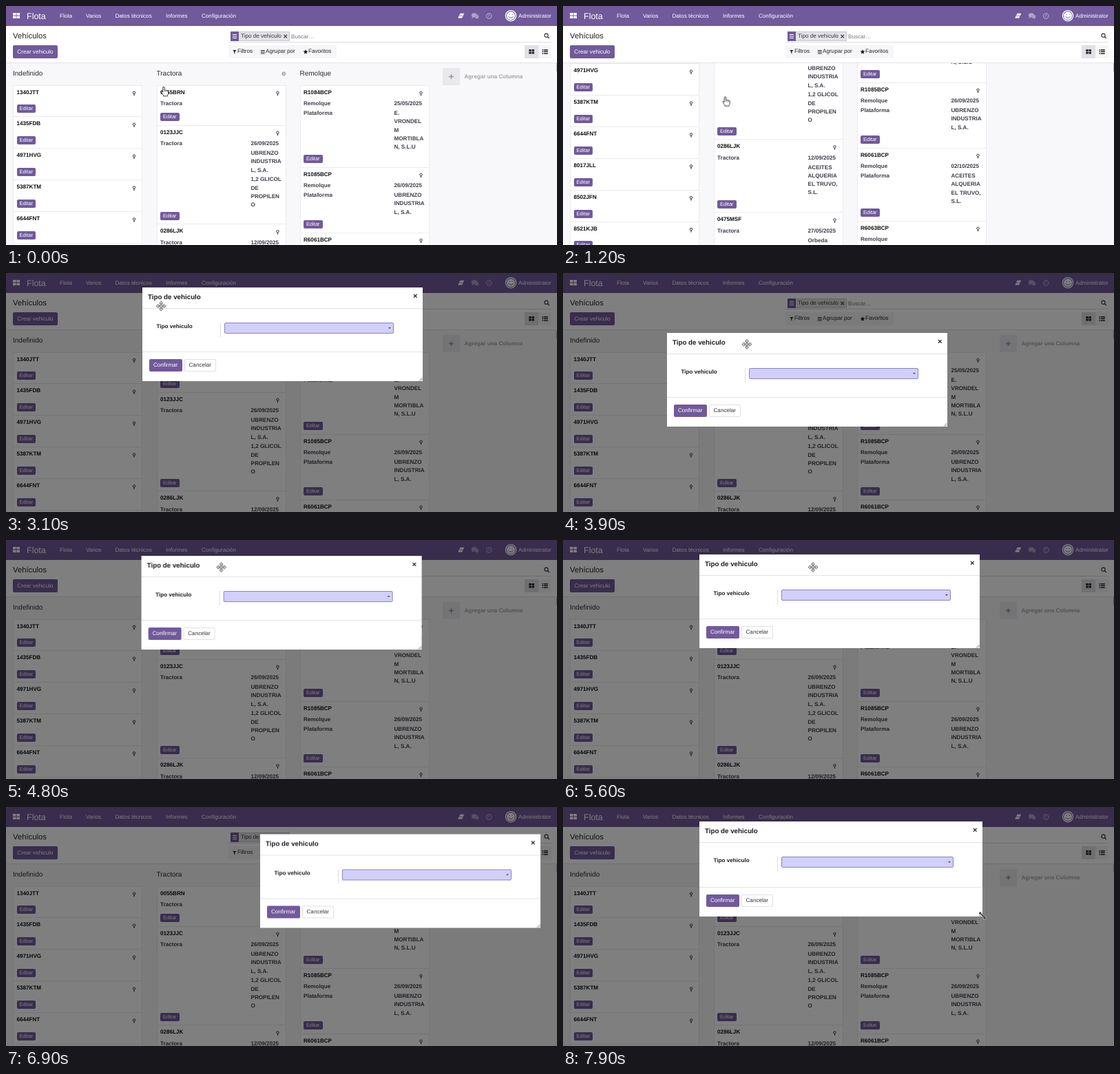
Animation of 800 by 347 pixels, one loop 8 s. Source, as an HTML page:

```html
<!DOCTYPE html>
<html lang="es">
<head>
<meta charset="utf-8">
<title>Flota</title>
<style>
html, body { margin: 0; width: 100%; height: 100%; overflow: hidden; background: #fff; }
#stage {
  position: relative; width: 800px; height: 347px; overflow: hidden; background: #fff;
  font: 8.125px "Liberation Sans", Arial, sans-serif; color: #363841;
  text-rendering: geometricPrecision; --main: #705a9b; --line: #ebeaef;
}
#stage *, #stage { box-sizing: border-box; }
.t, .box, svg, .btn { position: absolute; }
.t { line-height: 12px; margin-top: -6px; white-space: nowrap; }
svg { left: 0; top: 0; overflow: visible; }
b.t { color: #3f404a; }
b.name { color: #111; }
.btn { background: var(--main); color: #fff; text-align: center; border-radius: 2px; white-space: nowrap; }
.edit { width: 27.5px; height: 12px; font-size: 7.5px; line-height: 12px; }
.head { font-size: 10px; color: #2c2c30; }

#nav { left: 0; top: 0; width: 800px; height: 28.5px; background: var(--main); color: #fff; }
#board { left: 0; top: 82px; width: 800px; height: 265px; overflow: hidden; background: #f8f7fa; border-top: 1px solid #e4e3e8; }
#scroll { left: 0; top: -83px; width: 800px; animation: scroll 8s infinite; }
#bar { left: 799px; top: 83px; width: 1px; height: 12px; background: #b5b5ba; }
.card { width: 188px; background: #fff; border: 1px solid var(--line); border-bottom: 0; }
#gear { animation: gear 8s step-end infinite; }
#create { left: 10px; top: 56.5px; width: 65px; height: 19px; line-height: 19px; animation: hover 8s step-end infinite; }

#shade { inset: 0; background: #000; animation: shade 8s infinite; }
#modal {
  left: 0; top: 0; width: 407px; height: 136px; background: #fff; color: #111;
  animation: drag 8s ease-in-out infinite, grow 8s linear infinite, show 8s infinite;
}
#modal b.t { color: #1c1c22; }
.rule { left: 0; right: 0; height: 1px; background: #e3e3e7; }
#select { left: 118.5px; right: 42.5px; top: 51px; height: 16px; background: #d2cffb; border: 1px solid #8c83bd; border-radius: 2px; }
#select i { position: absolute; right: 3px; top: 6px; border: 2px solid transparent; border-top: 2.5px solid #444; border-bottom: 0; }
#modal .btn { bottom: 14px; height: 18px; line-height: 18px; }
#modal .plain { background: #fff; color: #333; border: 1px solid #e0e0e4; line-height: 16px; }

#cursor { left: 0; top: 0; animation: point 8s ease-in-out infinite; }
#hand { animation: hand 8s step-end infinite; }
#move { animation: move 8s step-end infinite; }
#size { animation: size 8s step-end infinite; }

@keyframes scroll {
  0%, 6.25% { transform: none; }
  8.75%, 11.25% { transform: translateY(-61.5px); }
  13.75%, 18.75% { transform: translateY(-123px); }
  21.25% { transform: translateY(-61.5px); }
  23.75%, 100% { transform: none; }
}
@keyframes gear { 0% { opacity: 1; } 24% { opacity: 0; } }
@keyframes hover { 0% { background: var(--main); } 27% { background: #56457c; } 36% { background: var(--main); } }
@keyframes shade { 0%, 34.5% { opacity: 0; } 37%, 100% { opacity: .5; } }
@keyframes show { 0%, 35% { opacity: 0; } 37.5%, 100% { opacity: 1; } }
@keyframes drag {
  0%, 35% { transform: translate(198px, 8px); }
  37.5%, 41.25% { transform: translate(198px, 21px); }
  48.75%, 51.25% { transform: translate(151px, 87px); }
  61.25%, 71.25% { transform: translate(198px, 21px); }
  81.25%, 87.5% { transform: translate(369px, 39.5px); }
  93.75%, 100% { transform: translate(198px, 21px); }
}
@keyframes grow {
  0%, 97% { width: 407px; height: 136px; }
  98.75%, 100% { width: 411px; height: 138px; }
}
@keyframes point {
  0% { transform: translate(229px, 117px); }
  15%, 21.25% { transform: translate(235.5px, 131.5px); }
  27.5%, 35% { transform: translate(44px, 69.5px); }
  41.25% { transform: translate(314px, 37.5px); }
  48.75%, 51.25% { transform: translate(267px, 103.5px); }
  61.25% { transform: translate(314px, 37.5px); }
  67.5%, 71.25% { transform: translate(363px, 39.5px); }
  81.25%, 87.5% { transform: translate(534px, 58px); }
  93.75% { transform: translate(363px, 39.5px); }
  97% { transform: translate(605px, 155.5px); }
  98.75%, 100% { transform: translate(609px, 157.5px); }
}
@keyframes hand { 0% { opacity: 1; } 37% { opacity: 0; } }
@keyframes move { 0% { opacity: 0; } 37% { opacity: 1; } 85% { opacity: 0; } 87.5% { opacity: 1; } 96.5% { opacity: 0; } }
@keyframes size { 0% { opacity: 0; } 96.5% { opacity: 1; } }
</style>
</head>
<body>
<div id="stage">
  <div id="board" class="box"><div id="scroll" class="box"></div></div>
  <div id="bar" class="box"></div>

  <div id="nav" class="box">
    <svg width="800" height="28" fill="#fff">
      <path d="M10 10h4.600v3.600H10zM15.400 10H20v3.600h-4.600zM10 14.500h4.600v3.600H10zM15.400 14.500H20v3.600h-4.600z"/>
      <path d="M659.500 10.800h5.800l-3.300 6.600h-5.800z"/><path d="M658 14.200h5.300" stroke="#705a9b" stroke-width=".8"/>
      <g opacity=".45">
        <ellipse cx="679.800" cy="13.300" rx="4" ry="3"/><path d="M677 15l-.8 3 3-1.700z"/>
        <path d="M684.500 12.500q3.500 2.500.7 4.700l.8 1.800-2.700-1.200q-2 .2-3.800-1 4.500-.3 5-4.300z"/>
        <circle cx="701.300" cy="14.500" r="3.700" fill="none" stroke="#fff" stroke-width="1.200"/>
        <path d="M701.500 12.300v2.600h-1.800" fill="none" stroke="#fff" stroke-width=".9"/>
      </g>
      <circle cx="733" cy="14.200" r="7.600" fill="none" stroke="#fff" stroke-width="1.300"/>
      <circle cx="733" cy="14.200" r="6"/>
      <path d="M729.300 14.800q3.700 5.200 7.400 0M730.300 12.200h1.500M734.300 12.200h1.500" fill="none" stroke="#705a9b"/>
    </svg>
  </div>

  <div id="panel">
    <div id="create" class="btn">Crear vehiculo</div>
    <div class="box" style="left:323px;top:52px;width:469px;height:1px;background:#dddce3"></div>
    <div class="box" style="left:326px;top:37px;width:86px;height:13.5px;background:#e2e2e5;border:1px solid #c9c8d0"></div>
    <div class="box" style="left:326px;top:37px;width:12px;height:13.5px;background:#705a9b"></div>
    <div class="box" style="left:323px;top:57px;width:157px;height:19px;background:#f6f6f8"></div>
    <div class="box" style="left:753px;top:57px;width:39px;height:19px;background:#f6f6f8"></div>
    <div class="box" style="left:753px;top:57px;width:20px;height:19px;background:#e0e0e6"></div>
    <svg width="800" height="83" fill="#222">
      <path d="M329 41.500h6M329 44h6M329 46.500h6" stroke="#fff" stroke-width="1.200"/>
      <path d="M403.500 41.800l4.400 4.400m0-4.400l-4.400 4.400" stroke="#555" stroke-width="1.500"/>
      <circle cx="784.500" cy="42.700" r="2.600" fill="none" stroke="#333" stroke-width="1.100"/>
      <path d="M786.400 44.600l2.400 2.400" stroke="#333" stroke-width="1.300"/>
      <path d="M329.200 64h5.200l-2 2.600v3l-1.200-1v-2z"/>
      <path d="M369.800 64.500h6M369.800 66.800h6M369.800 69h6" stroke="#222" stroke-width="1.100"/>
      <path d="M435 63l1 2.200 2.400.3-1.800 1.700.5 2.400-2.100-1.200-2.100 1.200.5-2.400-1.800-1.700 2.400-.3z"/>
      <path d="M759.300 63h3.400v2.800h-3.400zM763.500 63h3.400v2.800h-3.400zM759.300 66.600h3.400v2.800h-3.400zM763.500 66.600h3.400v2.800h-3.400z"/>
      <path d="M778.500 63.700h1.500m.8 0h6M778.500 66.300h1.500m.8 0h6M778.500 68.900h1.500m.8 0h6" stroke="#222" stroke-width="1.500"/>
    </svg>
  </div>

  <div id="shade" class="box"></div>
  <div id="modal" class="box">
    <b class="t" style="left:8px;top:14.5px;font-size:9.75px">Tipo de vehiculo</b>
    <b class="t" style="right:7.5px;top:13px;font-size:11px">×</b>
    <div class="box rule" style="top:30px"></div>
    <b class="t" style="left:20.5px;top:57px">Tipo vehiculo</b>
    <div class="box" style="left:113px;top:51px;width:1px;height:21px;background:#dedee3"></div>
    <div id="select" class="box"><i></i></div>
    <div class="box rule" style="bottom:42px"></div>
    <div class="btn" style="left:9.5px;width:48.5px">Confirmar</div>
    <div class="btn plain" style="left:61px;width:45.5px">Cancelar</div>
    <svg width="6" height="6" style="left:auto;top:auto;right:0;bottom:0"><path d="M1 5.500l4.500-4.500M3.300 5.500l2.200-2.200" stroke="#666" stroke-width=".8"/></svg>
  </div>

  <div id="cursor" class="box">
    <svg id="hand" width="12" height="15" fill="#fff" stroke="#222" stroke-width=".9" stroke-linejoin="round">
      <path d="M-1.200 1q1.200-1.800 2.400 0v4.300q1.200-1 2 .1 1.200-.7 1.900.4 1.500-.4 1.600 1v3q-.2 1.700-1.200 2.700v1.300H-.5v-1.300q-1.600-1.800-2.800-4.500-.3-1.600 1.100-1.100l1 1.100z"/>
      <path d="M1.200 5.500v2M3.200 5.800v1.900M5.100 6.200v1.600" stroke-width=".6"/>
    </svg>
    <svg id="move" width="1" height="1" fill="#fff" stroke="#333" stroke-width=".8" stroke-linejoin="round">
      <path id="arrows" d=""/>
    </svg>
    <svg id="size" width="1" height="1" fill="#222" stroke="#fff" stroke-width=".5">
      <path d="M-5-5h4.200l-1.400 1.400 5.800 5.800L5 .8V5H.8l1.400-1.400-5.800-5.800L-5-.8z"/>
    </svg>
  </div>
</div>

<script>
const $ = id => document.getElementById(id);
const add = (id, html) => $(id).insertAdjacentHTML('beforeend', html);
const text = (x, y, s, cls = '', tag = 'span', css = '') =>
  `<${tag} class="t ${cls}" style="left:${x}px;top:${y}px;${css}">${s}</${tag}>`;

add('nav', text(30, 14.5, 'Flota', '', 'span', 'font-size:12.5px') +
  [[78, 'Flota'], [116, 'Varios'], [158.5, 'Datos técnicos'], [232, 'Informes'],
   [284, 'Configuración'], [744, 'Administrator']].map(([x, s]) => text(x, 14.5, s)).join(''));

add('panel', text(10, 43.5, 'Vehículos', '', 'span', 'font-size:11.25px;color:#222') +
  text(341, 43.7, 'Tipo de vehiculo') +
  text(414, 44.5, 'Buscar…', '', 'span', 'color:#777') +
  [[336, 'Filtros'], [377, 'Agrupar por'], [439, 'Favoritos']]
    .map(([x, s]) => text(x, 66.3, s, '', 'span', 'color:#222')).join(''));

const pin = (x, y) => `<svg width="1" height="1" fill="none" stroke="#333">
  <circle cx="${x}" cy="${y - 1.2}" r="1.7"/><path d="M${x} ${y + .6}v2.600" stroke-width="1.200"/></svg>`;

// Each row is [label, value]; "|" marks a line break inside the value.
function card(x, top, h, name, rows = []) {
  let y = top + 27.8;
  let html = `<div class="box card" style="left:${x}px;top:${top}px;height:${h}px"></div>` +
    text(x + 5.5, top + 11, name, 'name', 'b') + pin(x + 176, top + 12.5);
  for (const [label, value = ''] of rows) {
    html += text(x + 5.5, y, label, '', 'b');
    const lines = value.split('|');
    lines.forEach((s, i) => html += text(x + 137, y + i * 12.3, s, '', 'b'));
    y += (lines.length - 1) * 12.3 + 13.7;
  }
  return html + `<div class="btn edit" style="left:${x + 5.5}px;top:${top + h - 17.3}px">Editar</div>`;
}

function column(x, title, cards) {
  let top = 114.5;
  add('scroll', text(x, 98.5, title, 'head'));
  for (const [h, name, rows] of cards) {
    add('scroll', card(x, top, h, name, rows));
    top += h;
  }
}

const plant = 'UBRENZO|INDUSTRIA|L, S.A.';
const oil = 'ACEITES|ALQUERIA|EL TRUVO,|S.L.';

column(10, 'Indefinido',
  ['1340JTT', '1435FDB', '4971HVG', '5387KTM', '6644FNT', '8017JLL', '8502JFN', '8521KJB']
    .map(name => [45.9, name]));
column(218.5, 'Tractora', [
  [58, '0055BRN', [['Tractora']]],
  [143.5, '0123JJC', [['Tractora', '26/09/2025'], ['', plant], ['', '1,2 GLICOL|DE|PROPILEN|O']]],
  [106, '0286LJK', [['Tractora', '12/09/2025'], ['', oil]]],
  [106, '0475MSF', [['Tractora', '27/05/2025'], ['', 'Orbeda']]]
]);
column(426.5, 'Remolque', [
  [119, 'R1084BCP', [['Remolque', '25/05/2025'], ['Plataforma', 'E.|VRONDEL|M|MORTIBLA|N, S.L.U']]],
  [95, 'R1085BCP', [['Remolque', '26/09/2025'], ['Plataforma', plant]]],
  [106, 'R6061BCP', [['Remolque', '02/10/2025'], ['Plataforma', oil]]],
  [106, 'R6063BCP', [['Remolque'], ['Plataforma']]]
]);

add('scroll', `<svg id="gear" width="1" height="1" fill="none" stroke="#999">
    <circle cx="403.300" cy="98.500" r="1.800" stroke-width="1.300"/>
    <circle cx="403.300" cy="98.500" r="2.800" stroke-dasharray="1.100 1.100"/></svg>
  <div class="box" style="left:634px;top:90px;width:24.5px;height:25px;background:#e9e9ed"></div>
  <svg width="1" height="1"><path d="M643.200 102.500h6.600m-3.300-3.300v6.600" stroke="#929298" stroke-width="1.500"/></svg>` +
  text(665.5, 102.5, 'Agregar una Columna', '', 'b', 'color:#a3a3a9'));

// Four-way arrow: one arm turned around the centre.
const arm = [[-.8, -.8], [-.8, -4], [-2.4, -4], [0, -7], [2.4, -4], [.8, -4]];
const turn = ([x, y], n) => n ? turn([-y, x], n - 1) : [x, y];
$('arrows').setAttribute('d', 'M' + [0, 1, 2, 3]
  .flatMap(n => arm.map(p => turn(p, n).join(' '))).join('L') + 'z');
</script>
</body>
</html>
```
